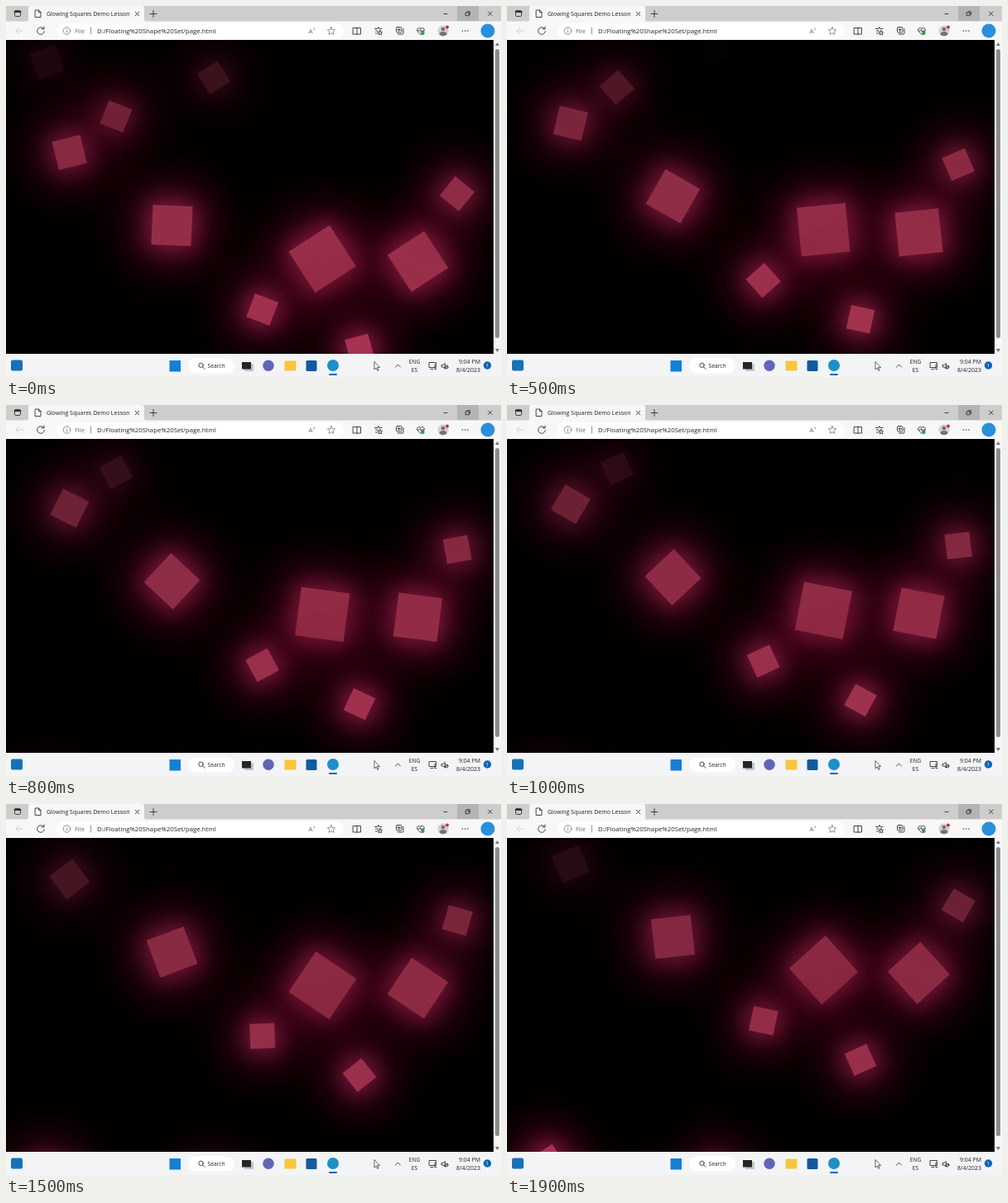
An HTML page that plays this animation: 598x448 px, repeating every 2 s.

```html
<!DOCTYPE html>
<html lang="en">
<head>
<meta charset="utf-8">
<title>Glowing squares</title>
<style>
  html, body { margin: 0; width: 100%; height: 100%; overflow: hidden; background: #f7f7f7; }
  #page { position: absolute; left: 0; top: 41px; width: 589px; height: 379px; overflow: hidden; background: #000; }
  #page div {
    position: absolute; left: 0; top: 0; background: #aa3553;
    box-shadow: 0 0 24px 3px #8c1c43, 0 0 50px 12px rgba(132, 20, 58, .85), 0 0 90px 20px rgba(110, 12, 42, .45);
  }
  svg { position: absolute; left: 0; top: 0; width: 598px; height: 448px; }
  text { font-family: "Open Sans", "Noto Sans", sans-serif; fill: #222; }
  .line { fill: none; stroke: #333; stroke-width: .9; stroke-linecap: round; stroke-linejoin: round; }
</style>
</head>
<body>
<div id="page"></div>
<svg viewBox="0 0 598 448">
  <!-- title bar -->
  <rect width="598" height="19" fill="#cdcdcd"/>
  <rect x="545" width="26" height="18" fill="#b4b4b4"/>
  <path d="M24 19q3 0 3-3V3q0-3 3-3H164q3 0 3 3V16q0 3 3 3Z" fill="#f7f7f7"/>
  <g class="line">
    <rect x="10.5" y="5.5" width="7" height="7" rx="1.2"/>
    <path d="M10.5 7h7" stroke-width="2"/>
    <path d="M35.5 5h4l2.5 2.5v6h-6.5zM39.5 5v2.5h2.5"/>
    <path d="M156.2 7.2l4.6 4.6m0-4.6l-4.6 4.6M174 9.5h8m-4-4v8"/>
    <path d="M529 9.5h4M582.5 7l4.6 4.6m0-4.6l-4.6 4.6"/>
    <path d="M555.5 8h3.7v3.7h-3.7zM556.8 6.7h3.7v3.7"/>
  </g>
  <text x="49" y="12" font-size="7">Glowing Squares Demo Lesson</text>

  <!-- toolbar -->
  <rect y="18.5" width="598" height="22.5" fill="#f7f7f7"/>
  <rect x="61" y="21" width="347" height="18" rx="9" fill="#fff"/>
  <path class="line" d="M20.5 30h-8.5m3.5-3.5l-3.5 3.5l3.5 3.5" style="stroke:#ccc"/>
  <g class="line">
    <path d="M45.5 27.5a4.3 4.3 0 1 0 .8 3M46 25v2.8h-2.8"/>
    <path d="M419.5 26.5h9v7.5h-9zM424 26v8.5"/>
    <path d="M445.5 27.5h3.5l1-2 1 2h3M446.5 30h3m-3 3h2.5M452 29.5l.8 1.8 1.8.2-1.3 1.3.4 2-1.7-1-1.7 1 .4-2-1.3-1.3 1.8-.2z"/>
    <rect x="471.5" y="25.5" width="6.5" height="6.5" rx="1.3"/>
    <path d="M473.5 34h5.5q1 0 1-1v-5.5M474.8 27v3.5m-1.8-1.7h3.6"/>
    <path d="M501 34.5l-3.8-3.9a2.4 2.4 0 0 1 3.8-3.2a2.4 2.4 0 0 1 3.8 3.2zM497.5 30h2l1-1.5 1.3 3 .9-1.5h2"/>
  </g>
  <circle cx="503.5" cy="32.8" r="2.2" fill="#3b9a49"/>
  <g class="line" style="stroke:#777;stroke-width:.8">
    <circle cx="73.5" cy="30" r="4.3"/>
    <path d="M73.5 29.5v2.5m0-4.5v.1M102.5 26v8"/>
    <path d="M393 25.5l1.4 3 3.2.4-2.4 2.2.7 3.2-2.9-1.6-2.9 1.6.7-3.2-2.4-2.2 3.2-.4z"/>
    <path d="M372 26.5q1.5 1.2 0 2.6"/>
  </g>
  <text x="83" y="32.8" font-size="7.5" style="fill:#666">File</text>
  <text x="110" y="32.8" font-size="7.8">D:/Floating%20Shape%20Set/page.html</text>
  <text x="365.5" y="33" font-size="8" style="fill:#666">A</text>
  <circle cx="528" cy="30" r="6.5" fill="#d3d0ce"/>
  <circle cx="528" cy="28" r="2.3" fill="#77706e"/>
  <path d="M523.5 34.5q0-3.5 4.5-3.5t4.5 3.5q-4.5 3.5-9 0z" fill="#77706e"/>
  <circle cx="533" cy="25.5" r="2" fill="#d22b35"/>
  <path class="line" d="M551.5 30h.01m3.2 0h.01m3.2 0h.01" style="stroke-width:1.6"/>
  <circle cx="582" cy="30" r="8.5" fill="#2a8fdc"/>

  <!-- scroll bar -->
  <rect x="589" y="41" width="9" height="379" fill="#f6f6f6"/>
  <rect x="591" y="52" width="5" height="349" rx="2.5" fill="#8c8c8c"/>
  <path d="M591 48l2.5-4 2.5 4zM591 414l2.5 4 2.5-4z" fill="#777"/>

  <!-- taskbar -->
  <rect y="420" width="598" height="28" fill="#f3f4f6"/>
  <rect x="6" y="427.5" width="14" height="13" rx="2" fill="#1671b8"/>
  <rect x="197.5" y="428" width="13.5" height="13.5" fill="#147fd6"/>
  <rect x="220" y="425.5" width="56" height="18" rx="9" fill="#fff"/>
  <g class="line"><circle cx="235.5" cy="433.8" r="2.7"/><path d="M237.5 435.8l2.5 2.5"/></g>
  <text x="243.5" y="437" font-size="6.7">Search</text>
  <rect x="288" y="432" width="11" height="9" fill="#c4c5c7"/>
  <rect x="285" y="430" width="11" height="8.5" fill="#252525"/>
  <circle cx="317" cy="434.3" r="6.7" fill="#6264b8"/>
  <rect x="336.5" y="428.5" width="14" height="12" rx="1" fill="#f9c63c"/>
  <rect x="362.5" y="428" width="13" height="13" rx="1.5" fill="#125a9e"/>
  <circle cx="395" cy="434" r="7" fill="#1b90c9"/>
  <rect x="390" y="444" width="10" height="2" rx="1" fill="#1067b5"/>
  <path d="M445 429.5v9.5l2.2-2 1.5 3.3 1.4-.6-1.5-3.2h2.9z" fill="#fff" stroke="#222" stroke-width=".7"/>
  <g class="line">
    <path d="M470.5 436l3-3 3 3"/>
    <path d="M511.5 430.5h8v6h-8zM513 438.5h3M518 433v5.5h2"/>
    <path d="M526.5 433.5h1.5l2.3-2v6.5l-2.3-2h-1.5z"/>
    <circle cx="532" cy="436" r="2"/><path d="M530.6 437.4l2.8-2.8"/>
  </g>
  <g font-size="6.6" text-anchor="middle">
    <text x="493.5" y="432.2">ENG</text><text x="493.5" y="441.8">ES</text>
  </g>
  <g font-size="6.95" text-anchor="end">
    <text x="573" y="432.2">9:04 PM</text><text x="573" y="442">8/4/2023</text>
  </g>
  <circle cx="581.5" cy="434" r="4.7" fill="#0f66b4"/>
  <text x="581.5" y="436.2" font-size="6" text-anchor="middle" style="fill:#fff">1</text>
</svg>
<script>
const LOOP = 2000, STEP = 100;
const TOP = 41;     // upper edge of the page
const END = 60;     // a square vanishes when its lower side gets here
const SPAN = 470;   // height of one full climb
const TURN = 0.775; // degrees per pixel climbed

// centre x, centre y and side at the start of the loop
const squares = [
  [49.5, 68, 33], [251, 86.5, 29], [132.5, 133.5, 29.5], [76.5, 177, 34.5], [200.5, 265, 48],
  [382.5, 305.5, 58.5], [497.5, 308.5, 53], [310, 366.5, 29.5], [427, 413.5, 29], [545, 227, 29.5]
];

// time and distance climbed: a steady drift with two quick spells
const climb = [[0, 0], [300, 10.5], [600, 47.5], [1000, 57], [1300, 69.5], [1600, 94.5], [1900, 104.5]];

function climbed(t) {
  const i = Math.max(1, climb.findIndex(([time]) => t <= time));
  const [t0, d0] = climb[i - 1], [t1, d1] = climb[i];
  return d0 + (d1 - d0) * (t - t0) / (t1 - t0);
}

// dims slowly on the way up, then quickly near the end
const glow = left => (0.7 + 0.00075 * left) * (1 - Math.exp(-Math.pow(left / 55, 1.6)));

const page = document.getElementById("page");
const nodes = squares.map(([, , size]) => {
  const el = page.appendChild(document.createElement("div"));
  el.style.width = el.style.height = size + "px";
  return el;
});

function draw(ms) {
  const up = climbed(Math.floor((ms % LOOP) / STEP) * STEP);
  squares.forEach(([x, y, size], i) => {
    const half = size / 2;
    const left = (y + half - END - up + SPAN) % SPAN;
    const top = left + END - size - TOP;
    const s = nodes[i].style;
    s.transform = `translate(${x - half}px, ${top}px) rotate(${-left * TURN}deg)`;
    s.opacity = glow(left);
  });
}

const start = performance.now();
function tick() {
  draw(performance.now() - start);
  requestAnimationFrame(tick);
}
tick();
</script>
</body>
</html>
```
